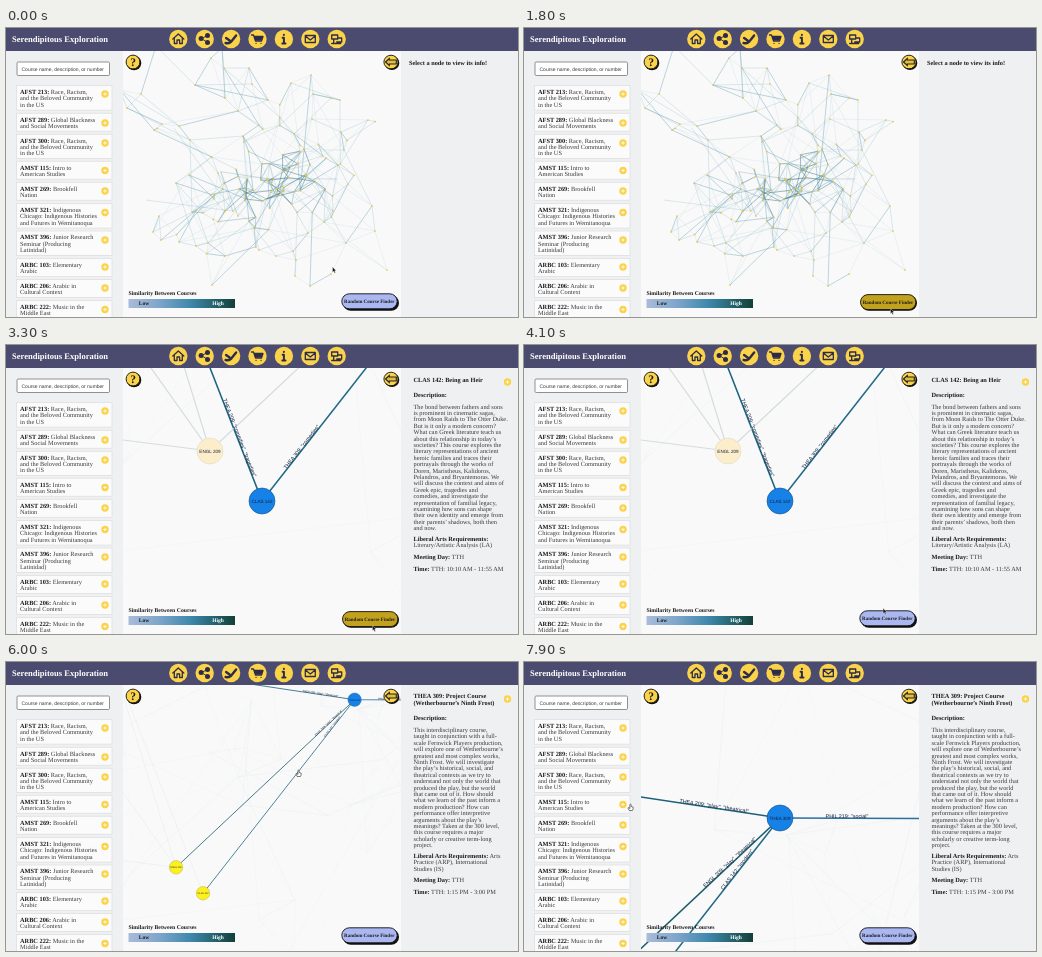
Write an HTML page that moves like this. It is 512 px wide and 289 px high and loops after 8 s.

```html
<!DOCTYPE html>
<html lang="en">
<head>
<meta charset="utf-8">
<title>Course explorer</title>
<style>
html, body { margin: 0; width: 100%; height: 100%; overflow: hidden; background: #eff0f1; }
svg { display: block; width: 100vw; height: 100vh; }
text { font-family: "Liberation Serif", "Times New Roman", serif; fill: #3a3a3c; text-rendering: geometricPrecision; white-space: pre; }
.sans { font-family: "Liberation Sans", Arial, sans-serif; }
.b { font-weight: 700; fill: #1c1c1e; }
.mid { text-anchor: middle; }
.white, .white .b { fill: #fff; }
.note { fill: #10213c; }
.thin { vector-effect: non-scaling-stroke; fill: none; }
</style>
</head>
<body>
<svg id="stage" viewBox="0 0 512 289" preserveAspectRatio="none"></svg>
<script>
const LOOP = 8000, PICK = 2150, JUMP = 5560, ZOOM = 1000;
const GOLD = '#fbd34b', INK = '#2c2c48';
const stage = document.getElementById('stage');

function el(tag, attrs, parent = stage, content) {
  const node = document.createElementNS('http://www.w3.org/2000/svg', tag);
  for (const key in attrs) node.setAttribute(key, attrs[key]);
  if (content !== undefined) node.textContent = content;
  parent.appendChild(node);
  return node;
}
const rect = (x, y, width, height, fill, more, parent) => el('rect', { x, y, width, height, fill, ...more }, parent);
const dot = (cx, cy, r, fill, more, parent) => el('circle', { cx, cy, r, fill, ...more }, parent);

// Parts between asterisks are bold.
function write(x, y, size, str, parent, more) {
  const line = el('text', { x, y, 'font-size': size, ...more }, parent);
  str.split('*').forEach((part, i) => part && el('tspan', i % 2 ? { class: 'b' } : {}, line, part));
  return line;
}
function lines(x, y, str, parent) {
  str.split('|').forEach((s, i) => write(x, y + i * 6.4, 6.33, s, parent));
}
function plus(x, y, parent) {
  dot(x, y, 3.7, GOLD, {}, parent);
  el('path', { d: `M${x - 1.7} ${y}h3.4M${x} ${y - 1.7}v3.4`, stroke: '#fff', 'stroke-width': .8 }, parent);
}
function random(seed) {
  return () => (seed = (seed * 16807) % 2147483647) / 2147483647;
}

// ---- Graph ----
const defs = el('defs', {});
rect(117, 23, 278, 266, '#000', {}, el('clipPath', { id: 'view' }, defs));
const ramp = el('linearGradient', { id: 'ramp' }, defs);
[[0, '#aabbd9'], [.28, '#7fa6cb'], [.58, '#3f88ac'], [.82, '#23616b'], [1, '#143f38']]
  .forEach(([offset, color]) => el('stop', { offset, 'stop-color': color }, ramp));

rect(117, 23, 278, 266, '#f9f9f9');
const world = el('g', {}, el('g', { 'clip-path': 'url(#view)' }));
const cloud = el('g', {}, world);
const dots = el('g', {}, world);

const HOME = [232, 188];
const toWorld = ([x, y]) => [(x - HOME[0]) * 10, (y - HOME[1]) * 10];
const anchors = [
  [150, 18], [205, 30], [216, 20], [218, 40], [243, 40], [246, 56], [189, 57], [219, 70], [232, 83], [135, 66],
  [114, 62], [121, 80], [156, 96], [148, 102], [173, 98], [184, 112], [305, 47], [285, 55], [262, 72], [307, 66],
  [325, 70], [334, 72], [362, 92], [335, 104], [338, 122], [306, 91], [253, 97], [237, 108], [183, 147], [212, 145],
  [170, 155], [342, 156], [366, 178], [186, 184], [153, 188], [147, 204], [155, 212], [173, 214], [190, 218], [202, 215],
  [248, 200], [327, 183], [318, 194], [302, 205], [270, 228], [290, 232], [340, 215], [381, 242], [325, 246], [369, 203],
  [206, 257], [253, 222], [219, 228], [304, 258], [289, 248], [332, 137]
];

function buildCloud() {
  const rnd = random(4711);
  const bell = () => rnd() + rnd() + rnd() - 1.5;
  const points = anchors.slice();
  for (let i = 0; i < 40; i++) points.push([262 + bell() * 95, 150 + bell() * 85]);
  for (let i = 0; i < 34; i++) points.push([252 + bell() * 42, 169 + bell() * 28]);
  for (let i = 0; i < 14; i++) points.push([300 + bell() * 34, 143 + bell() * 24]);
  const tones = ['#c3dae4', '#9cc3d1', '#5b9ab2', '#23697a'];
  const paths = ['', '', '', ''];
  const seen = new Set();
  const join = (i, j, dist) => {
    const key = Math.min(i, j) + '-' + Math.max(i, j);
    if (seen.has(key)) return;
    seen.add(key);
    const [x, y] = points[i];
    const core = Math.hypot(x - 268, (y - 160) * 1.4) < 55;
    const tone = Math.min(3, Math.floor(rnd() * (core && dist < 30 ? 4.4 : 2.6)));
    paths[tone] += `M${toWorld(points[i])}L${toWorld(points[j])}`;
  };
  points.forEach((p, i) => {
    const near = points.map((q, j) => [Math.hypot(p[0] - q[0], p[1] - q[1]), j])
      .sort((a, b) => a[0] - b[0]).slice(1);
    near.slice(0, 2).forEach(([d, j]) => join(i, j, d));
    for (let n = 0; n < 2; n++) {
      const [d, j] = near[2 + Math.floor(rnd() * 26)];
      if (d < 80) join(i, j, d);
    }
  });
  paths.forEach((d, i) => el('path', { d, class: 'thin', stroke: tones[i], 'stroke-width': .34 + i * .05 }, cloud));
  points.forEach(p => {
    const [x, y] = toWorld(p);
    dot(x, y, 8.5, '#efc33f', {}, dots);
  });
}
buildCloud();

const places = {
  clas: [0, 0], thea: [292, -373], engl: [-52, -50], play: [-173, -443], phil: [992, -370],
  far1: [-922, -160], far2: [-642, -880]
};
const links = [
  ['clas', 'play', '#1d6482'], ['clas', 'thea', '#216a86'], ['thea', 'play', '#1d6078'],
  ['thea', 'phil', '#2b709f'], ['thea', 'engl', '#1c5c6a'], ['engl', 'far1', '#5d97ab'],
  ['engl', 'far2', '#5d97ab'], ['engl', 'play', '#5d97ab']
].map(([a, b, color]) => ({
  a, b, color,
  path: el('path', { d: `M${places[a]}L${places[b]}`, class: 'thin' }, world)
}));

const nodes = [['engl', 'ENGL 209'], ['clas', 'CLAS 142'], ['thea', 'THEA 309']].map(([id, name]) => {
  const [x, y] = places[id];
  const disc = dot(x, y, 13, GOLD, {}, world);
  const label = el('text', { x, y: y + 1.7, 'font-size': 4.6, class: 'sans mid note' }, world, name);
  return { id, disc, label };
});

// Text rests on its edge, a fixed way out from the node.
function edgeLabel(from, to, phase, str) {
  const [x, y] = places[from];
  const dx = places[to][0] - x, dy = places[to][1] - y;
  const len = Math.hypot(dx, dy);
  let angle = Math.atan2(dy, dx) * 180 / Math.PI;
  if (angle > 90) angle -= 180;
  if (angle < -90) angle += 180;
  const spot = `translate(${x + dx / len * 67} ${y + dy / len * 67}) rotate(${angle})`;
  const text = el('text', { transform: spot, y: -.3, 'font-size': 5.4, class: 'sans mid note' }, world, str);
  return { phase, text };
}
const labels = [
  edgeLabel('clas', 'thea', 1, 'THEA 309: "comedies"'),
  edgeLabel('clas', 'play', 1, 'THEA 209: "comedies", "tragedies"'),
  edgeLabel('thea', 'play', 2, 'THEA 209: "play", "theatrical"'),
  edgeLabel('thea', 'phil', 2, 'PHIL 219: "social"'),
  edgeLabel('thea', 'engl', 2, 'ENGL 209: "play", "theatrical"'),
  edgeLabel('thea', 'clas', 2, 'CLAS 142: "modern"')
];

// ---- Header ----
rect(0, 0, 512, 23, '#4b4b70');
write(6, 14, 8.55, '*Serendipitous Exploration*', stage, { class: 'white' });
const icons = [
  'M-5.5 0L0-5L5.5 0M-4-1V4.5H-1.3V1H1.3V4.5H4V-1',
  'M2.5-3.2L-3.4-.5L2.5 3.2',
  'M-5.5 4Q-1 5 1 1.5L5-3.5M-5-1L-1.5 1.5',
  'M-6-4H-4L-2 2H4L5.5-2.5H-3.5M-1.5 4.3h.1M3.5 4.3h.1',
  'M0-1.2V4.5M-1.3-1.2H0M-1.6 4.5H1.6M0-4.2v.1',
  'M-5-3.5H5V3.5H-5ZM-5-3L0 1L5-3',
  'M-5-4H1V0H-5ZM-3 1V4.5M0 3H5V-1H2M-5 4.5H4'
];
icons.forEach((d, i) => {
  const g = el('g', { transform: `translate(${172.3 + i * 26.4} 11)` });
  dot(0, 0, 9.2, GOLD, {}, g);
  el('path', {
    d, fill: 'none', stroke: INK, 'stroke-width': [1.3, .9, 2.4, 1.3, 2, 1.3, 1.3][i],
    'stroke-linejoin': 'round', 'stroke-linecap': 'round'
  }, g);
  if (i === 1) [[2.8, -3.4], [-3.6, -.5], [2.8, 3.4]].forEach(([x, y]) => dot(x, y, 2.5, INK, {}, g));
  if (i === 3) el('path', { d: 'M-3.4-2.5H5.3L4 1.6H-2.2Z', fill: INK }, g);
});

// ---- Course list ----
rect(0, 23, 117, 266, '#eff0f1');
rect(11, 34, 92.5, 13.5, '#fff', { rx: 1.2, stroke: '#777', 'stroke-width': .8 });
el('text', { x: 15.5, y: 42.6, 'font-size': 5, class: 'sans' }, stage, 'Course name, description, or number');
[
  [64, 66, '*AFST 213:* Race, Racism,|and the Beloved Community|in the US'],
  [91.5, 95, '*AFST 289:* Global Blackness|and Social Movements'],
  [112.5, 115, '*AFST 300:* Race, Racism,|and the Beloved Community|in the US'],
  [139.5, 142.5, '*AMST 115:* Intro to|American Studies'],
  [160.5, 163, '*AMST 269:* Brookfell|Nation'],
  [182, 184.5, '*AMST 321:* Indigenous|Chicago: Indigenous Histories|and Futures in Wemitanoqua'],
  [209.3, 212, '*AMST 396:* Junior Research|Seminar (Producing|Latinidad)'],
  [237, 239, '*ARBC 103:* Elementary|Arabic'],
  [257.8, 260, '*ARBC 206:* Arabic in|Cultural Context'],
  [279, 281.5, '*ARBC 222:* Music in the|Middle East']
].forEach(([y, plusY, str]) => {
  const rows = str.split('|').length;
  rect(10.5, y - 6.3, 95.5, rows * 6.4 + 5.2, '#fbfbfb', { stroke: '#dcdcdf', 'stroke-width': .7 });
  lines(14, y + 2, str, stage);
  plus(99, plusY);
});

// ---- Controls over the graph ----
dot(128, 35, 7.3, '#111');
dot(127, 34, 6.9, GOLD, { stroke: '#111', 'stroke-width': .9 });
el('text', { x: 127, y: 37.8, 'font-size': 11.5, class: 'b mid' }, stage, '?');
el('ellipse', { cx: 386, cy: 35, rx: 7.3, ry: 7, fill: '#111' });
el('ellipse', { cx: 385, cy: 34, rx: 7.1, ry: 6.8, fill: GOLD, stroke: '#111', 'stroke-width': .9 });
el('path', { d: 'M379.5 34L383.3 30.5V32H390.3V36H383.3V37.5Z', fill: '#e0bd45', stroke: '#222', 'stroke-width': 1.1 });
write(122.5, 267.3, 5.75, '*Similarity Between Courses*');
rect(122.5, 271, 106.5, 9, 'url(#ramp)');
el('text', { x: 138, y: 277.3, 'font-size': 5.5, class: 'b mid' }, stage, 'Low');
el('text', { x: 212, y: 277.3, 'font-size': 5.5, class: 'b mid', style: 'fill:#fff' }, stage, 'High');

rect(337, 267.2, 56, 15.6, '#111', { rx: 7.8 });
const button = el('g', {});
const pill = rect(335.8, 265.8, 55.4, 15, '#aab7f0', { rx: 7.5, stroke: '#111', 'stroke-width': .9 }, button);
el('text', { x: 363.3, y: 275, 'font-size': 5, class: 'b mid' }, button, 'Random Course Finder');

// ---- Info panel ----
rect(395, 23, 117, 266, '#eff0f1');
const panels = [0, 1, 2].map(() => el('g', {}));
write(403, 36.5, 6.33, '*Select a node to view its info!*', panels[0]);

function info(panel, blocks) {
  blocks.forEach(([y, str]) => lines(407.5, y, str, panel));
  plus(501.5, 37, panel);
}
info(panels[1], [
  [36.5, '*CLAS 142: Being an Heir*'],
  [51.5, '*Description:*'],
  [63.6, 'The bond between fathers and sons|is prominent in cinematic sagas,|from Moon Raids to The Otter Duke.|But is it only a modern concern?|What can Greek literature teach us|about this relationship in today’s|societies? This course explores the|literary representations of ancient|heroic families and traces their|portrayals through the works of|Doren, Maristheus, Kalidoros,|Pelandros, and Bryantemoras. We|will discuss the context and aims of|Greek epic, tragedies and|comedies, and investigate the|representation of familial legacy,|examining how sons can shape|their own identity and emerge from|their parents’ shadows, both then|and now.'],
  [195.5, '*Liberal Arts Requirements:*|Literary/Artistic Analysis (LA)'],
  [214, '*Meeting Day:* TTH'],
  [225.6, '*Time:* TTH: 10:10 AM - 11:55 AM']
]);
info(panels[2], [
  [36.3, '*THEA 309: Project Course*|*(Wetherbourne’s Ninth Frost)*'],
  [58.2, '*Description:*'],
  [70, 'This interdisciplinary course,|taught in conjunction with a full-|scale Fernwick Players production,|will explore one of Wetherbourne’s|greatest and most complex works,|Ninth Frost. We will investigate|the play’s historical, social, and|theatrical contexts as we try to|understand not only the world that|produced the play, but the world|that came out of it. How should|what we learn of the past inform a|modern production? How can|performance offer interpretive|arguments about the play’s|meanings? Taken at the 300 level,|this course requires a major|scholarly or creative term-long|project.'],
  [196, '*Liberal Arts Requirements:* Arts|Practice (ARP), International|Studies (IS)'],
  [220.3, '*Meeting Day:* TTH'],
  [232, '*Time:* TTH: 1:15 PM - 3:00 PM']
]);

// ---- Pointer ----
const pointer = el('g', {});
const arrow = el('path', {
  d: 'M0 0V5.2L1.2 4.2L2.1 6.1L3 5.7L2.1 3.8H3.7Z', fill: '#111', stroke: '#fff', 'stroke-width': .35
}, pointer);
const hand = el('path', {
  d: 'M-.6 0Q0-.7.6 0V2L2.6 2.6V4.6L1.9 6H-1.3L-2.6 3.4L-1.8 3L-.6 4Z', fill: '#fff', stroke: '#222', 'stroke-width': .6
}, pointer);
const stops = [
  [0, 326.5, 239], [1000, 326.5, 239], [1650, 366.5, 280.5], [3900, 366.5, 280.5],
  [4800, 292.5, 108.5], [6800, 292.5, 108.5], [7700, 106.5, 142.5], [LOOP, 106.5, 142.5]
];

// ---- Motion ----
const ease = x => x < .5 ? 2 * x * x : 1 - 2 * (1 - x) * (1 - x);
const part = (t, start) => ease(Math.min(1, Math.max(0, (t - start) / ZOOM)));
const mix = (a, b, p) => a + (b - a) * p;
const show = (node, on) => node.setAttribute('display', on ? 'inline' : 'none');

function pointerAt(t) {
  const i = stops.findIndex((s, n) => n > 0 && t <= s[0]);
  const [t0, x0, y0] = stops[i - 1], [t1, x1, y1] = stops[i];
  const p = ease((t - t0) / (t1 - t0));
  return [mix(x0, x1, p), mix(y0, y1, p)];
}

function cameraAt(t) {
  if (t < JUMP) {
    const k = .1 * Math.pow(10, part(t, PICK));
    const away = (1 / k - 1) / 9;
    return [240 * away, -320 * away, k];
  }
  const p = part(t, JUMP);
  return [mix(0, places.thea[0], p), mix(0, places.thea[1], p), 1 / (1 + 3.9 * p * (1 - p))];
}

function draw(t) {
  const phase = t < PICK ? 0 : t < JUMP ? 1 : 2;
  const chosen = [null, 'clas', 'thea'][phase];
  const [cx, cy, k] = cameraAt(t);
  world.setAttribute('transform', `translate(256 156) scale(${k}) translate(${-cx} ${-cy})`);
  cloud.setAttribute('opacity', phase ? .07 : .9);
  dots.setAttribute('opacity', phase ? 0 : 1);

  const linked = new Set();
  links.forEach(({ a, b, color, path }) => {
    const active = a === chosen || b === chosen;
    if (active) linked.add(a).add(b);
    path.setAttribute('stroke', active || !phase ? color : '#cbd5d6');
    path.setAttribute('opacity', active ? 1 : [.5, .8, .35][phase]);
    path.setAttribute('stroke-width', Math.max(.4, (active ? 1.55 : 1.2) * k));
  });
  nodes.forEach(({ id, disc, label }) => {
    const lit = linked.has(id);
    disc.setAttribute('fill', id === chosen ? '#1681e6' : !phase ? '#efc33f' : lit ? '#fdf01f' : '#fdeecb');
    disc.setAttribute('stroke-width', phase ? .6 : 0);
    disc.setAttribute('stroke', id === chosen ? '#164f86' : lit ? '#8a8a3a' : '#ddd8c6');
    disc.setAttribute('r', phase ? 13 : 8.5);
    show(label, phase);
  });
  labels.forEach(l => show(l.text, l.phase === phase));
  labels[0].text.style.fill = t >= 4700 && t < JUMP ? '#d9a520' : '';
  panels.forEach((p, i) => show(p, i === phase));

  const [x, y] = pointerAt(t);
  pointer.setAttribute('transform', `translate(${x} ${y})`);
  const grip = (t >= JUMP && t < 6400) || t >= 7600;
  show(hand, grip);
  show(arrow, !grip);

  const hover = x > 336 && x < 392 && y > 266 && y < 283;
  pill.setAttribute('fill', hover ? '#c2a11c' : '#aab7f0');
  button.setAttribute('transform', hover ? 'translate(.7 .8)' : '');
}

const began = performance.now();
function tick() {
  draw((performance.now() - began) % LOOP);
  requestAnimationFrame(tick);
}
tick();
</script>
</body>
</html>
```
